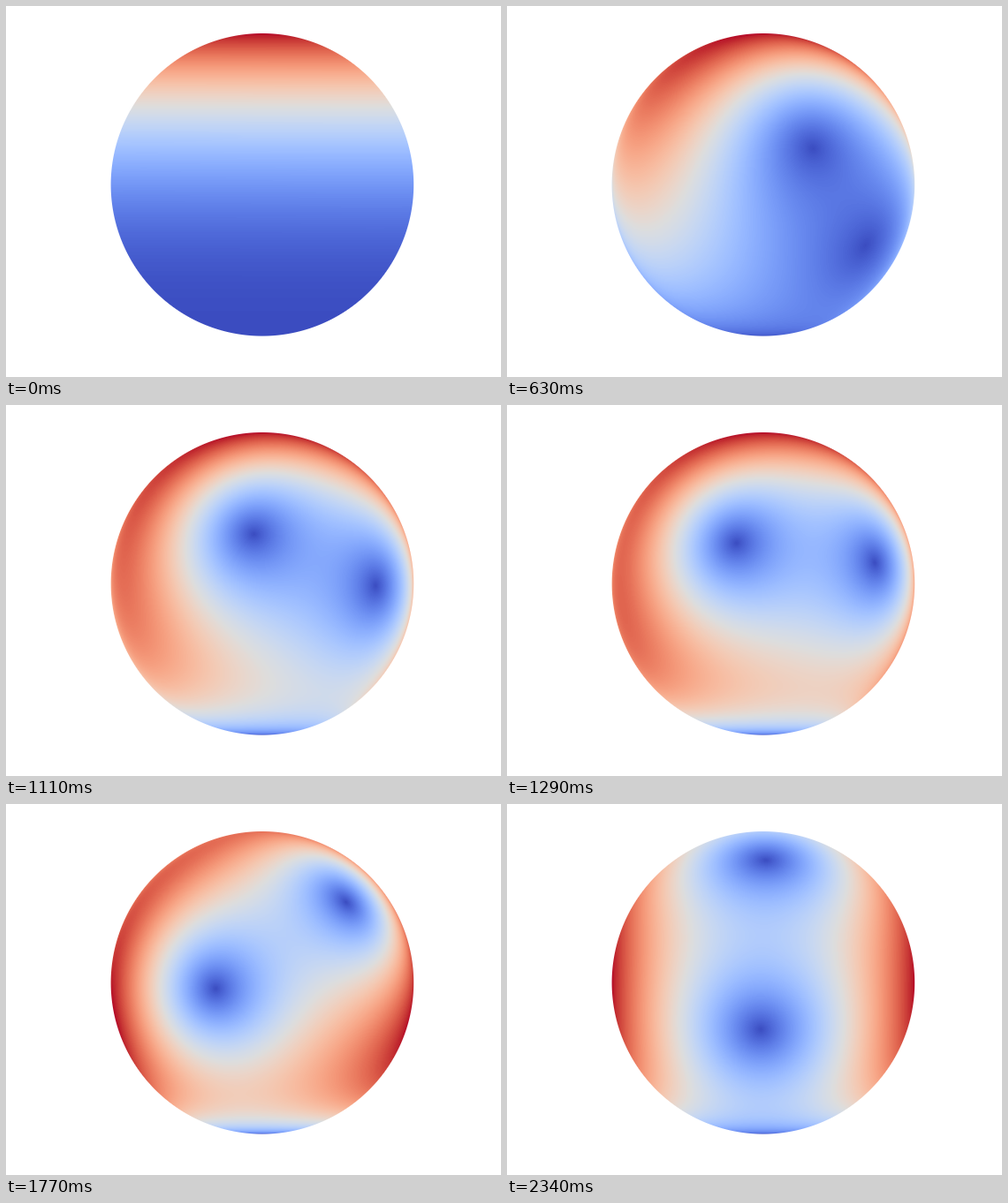
These frames come from a looping animation (560x420 px, 2370 ms). An HTML page with a canvas:

```html
<!DOCTYPE html>
<html lang="en">
<head>
<meta charset="utf-8">
<title>Twisting spin state</title>
<style>
  html, body { margin: 0; width: 100%; height: 100%; overflow: hidden; background: #fff; }
  canvas { display: block; }
</style>
</head>
<body>
<canvas id="stage" width="560" height="420"></canvas>
<script>
const W = 560, H = 420, CX = 289.9, CY = 202.3, R = 171.3;
const STEP_MS = 30, STEPS = 79, STEP_ANGLE = 0.02;
const ctx = document.getElementById('stage').getContext('2d');
const image = ctx.createImageData(W, H);

function labToRgb(L, a, b) {
  const f = (L + 16) / 116;
  const x = 0.9505 * (f + a / 500) ** 3, y = f ** 3, z = 1.089 * (f - b / 200) ** 3;
  return [
    3.2406 * x - 1.5372 * y - 0.4986 * z,
    -0.9689 * x + 1.8758 * y + 0.0415 * z,
    0.0557 * x - 0.204 * y + 1.057 * z
  ].map(c => Math.round(255 * (1.055 * Math.max(0, c) ** (1 / 2.4) - 0.055)));
}

// Diverging scale in polar Lab: saturation falls to a pale grey centre while the hue spins
function coolWarm(t) {
  const side = Math.abs(2 * t - 1);
  const size = 88 - 8 * side, sat = 1.08 * side;
  const hue = t < 0.5 ? -1.661 + 0.561 * side : 1.061 - 0.561 * side;
  const chroma = size * Math.sin(sat);
  return labToRgb(size * Math.cos(sat), chroma * Math.cos(hue), chroma * Math.sin(hue));
}
const palette = Array.from({ length: 256 }, (_, i) => coolWarm(i / 255));

// Stereographic coordinate w = re + i*im for each visible point of the sphere
const points = [];
for (let py = 0; py < H; py++) {
  for (let px = 0; px < W; px++) {
    const dx = (px + 0.5 - CX) / R, dz = (CY - py - 0.5) / R;
    const r = Math.hypot(dx, dz), cover = Math.min(1, (1 - r) * R + 0.5);
    if (cover <= 0) continue;
    const inside = Math.max(1, r), z = dz / inside;
    const depth = Math.sqrt(Math.max(0, 1 - r * r));
    const y = dx / inside + 0.005 * depth;
    const re = z / (1 + depth), im = y / (1 + depth);
    const scale = ((1 + depth) / 2) ** 2.5 * Math.hypot(1 + re, im);
    const at = 4 * (py * W + px);
    image.data[at + 3] = 255 * cover;
    points.push({ at, re, im, scale });
  }
}
const values = new Float64Array(points.length);

// Amplitude of a five-spin state under one-axis twisting, |1+w| |w^4 + p w^3 + q w^2 + p w + 1|
function draw(angle) {
  const c4 = 5 * Math.cos(4 * angle), s4 = 5 * Math.sin(4 * angle);
  const p = [c4 - 1, s4];
  const q = [1 - c4 + 10 * Math.cos(6 * angle), 10 * Math.sin(6 * angle) - s4];
  const coefs = [p, q, p, [1, 0]];
  let max = 0;
  points.forEach(({ re, im, scale }, i) => {
    let a = 1, b = 0;
    for (let k = 0; k < 4; k++) {
      const next = a * re - b * im + coefs[k][0];
      b = a * im + b * re + coefs[k][1];
      a = next;
    }
    values[i] = scale * Math.sqrt(a * a + b * b);
    if (values[i] > max) max = values[i];
  });
  points.forEach(({ at }, i) => {
    const color = palette[Math.round(values[i] / max * 255)];
    for (let c = 0; c < 3; c++) image.data[at + c] = color[c];
  });
  ctx.putImageData(image, 0, 0);
}

let start, shown = -1;
function tick(now) {
  start ??= now;
  const step = Math.floor(Math.max(0, now - start) / STEP_MS) % STEPS;
  if (step !== shown) draw(step * STEP_ANGLE);
  shown = step;
  requestAnimationFrame(tick);
}
draw(0);
requestAnimationFrame(tick);
</script>
</body>
</html>
```
